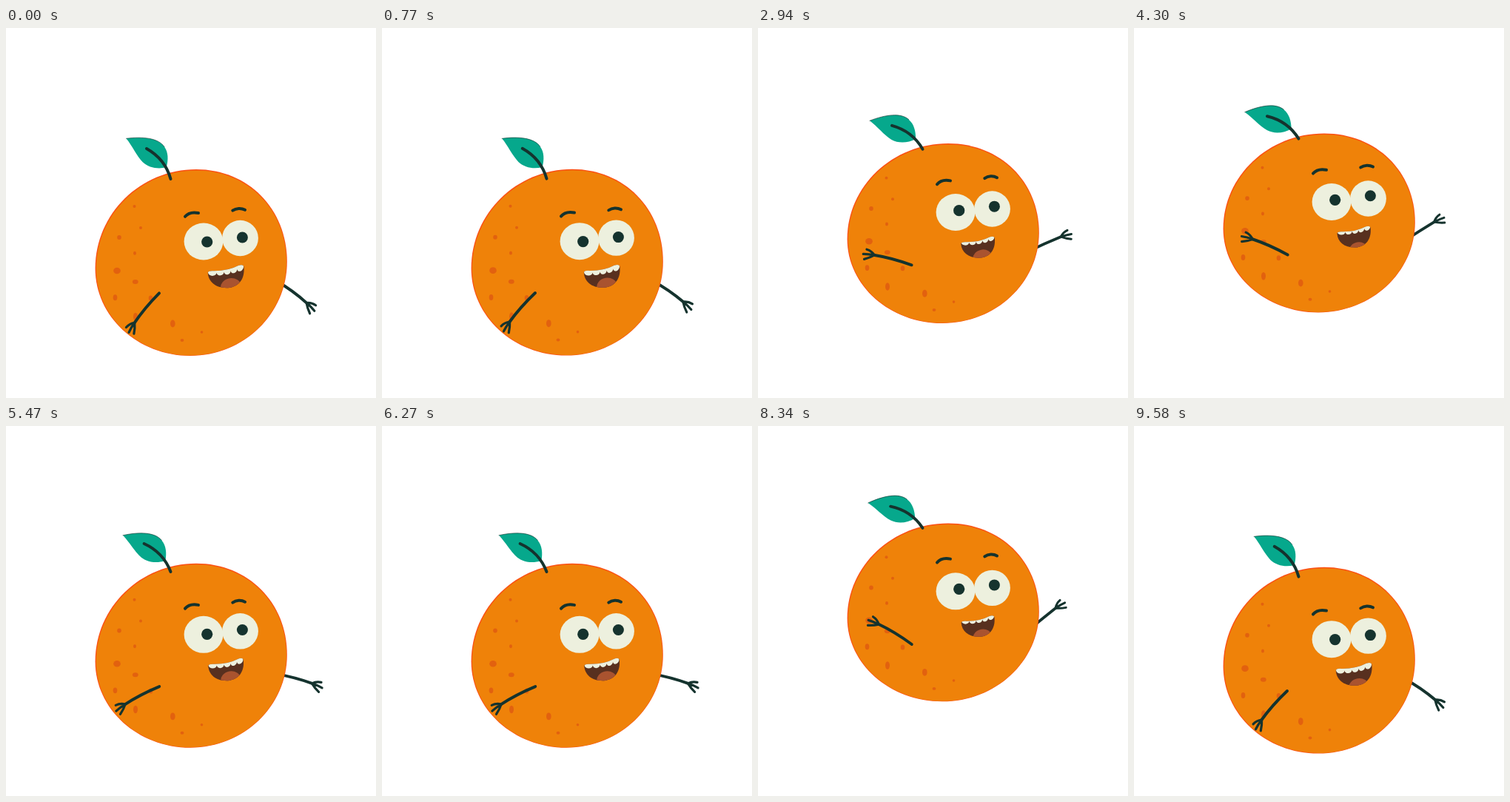
Write an HTML page with a canvas that moves like this. It is 500x500 px and loops after 9.62 s.

```html
<!DOCTYPE html>
<html lang="en">
<head>
<meta charset="utf-8">
<title>Bouncing orange</title>
<style>
  html, body { margin: 0; width: 100%; height: 100%; overflow: hidden; background: #fff; }
  canvas { display: block; width: 500px; height: 500px; }
</style>
</head>
<body>
<canvas id="stage"></canvas>
<script>
const LOOP = 9620, FRAMES = 288, STEP = LOOP / FRAMES;
const BOUNCE = 24, TALK = 23.3;
const INK = '#15332e', PEEL = '#ef8209', RIM = '#fb4f14', SPOT = '#e2610f';
const CREAM = '#edf0de', MOUTH = '#58301f', TONGUE = '#a9532f', LEAF = '#06a88c';
const RAD = Math.PI / 180;

// x, y, rx, ry of the peel marks
const SPOTS = [
  [173.5, 241, 2, 2], [182, 270, 2, 2], [153, 283, 2.8, 3], [174, 304.3, 2, 2.5],
  [150, 328, 4.8, 4.3], [174.8, 343, 3.9, 3], [147.5, 364.3, 2.8, 4], [195.5, 365, 2.8, 3.6],
  [175, 390, 3, 5.3], [225.3, 399.5, 3.3, 5], [238, 422, 2.4, 2], [264.5, 411, 1.8, 1.8]
];

const canvas = document.getElementById('stage');
const ctx = canvas.getContext('2d');
const ratio = window.devicePixelRatio || 1;
canvas.width = canvas.height = 500 * ratio;

const smooth = s => s * s * (3 - 2 * s);

// Cubic ease with flat ends; a and b are the handle positions in time
function ease(x, a, b) {
  let lo = 0, hi = 1;
  for (let i = 0; i < 30; i++) {
    const s = (lo + hi) / 2, r = 1 - s;
    if (3 * r * r * s * a + 3 * r * s * s * b + s * s * s < x) lo = s;
    else hi = s;
  }
  return smooth(lo);
}

// Runs 0 to 1 and back over one period
function pingPong(frame, period) {
  const p = (frame % period) / period;
  return 1 - Math.abs(1 - 2 * p);
}

function group(draw) {
  ctx.save();
  draw();
  ctx.restore();
}

function oval(x, y, rx, ry, color, turn = 0) {
  ctx.beginPath();
  ctx.ellipse(x, y, rx, ry, turn, 0, 2 * Math.PI);
  ctx.fillStyle = color;
  ctx.fill();
}

function line(d, width) {
  ctx.lineWidth = width;
  ctx.strokeStyle = INK;
  ctx.stroke(new Path2D(d));
}

function fill(d, color) {
  ctx.fillStyle = color;
  ctx.fill(new Path2D(d));
}

// Points along +x; side is -1 for the mirrored arm
function arm(x, y, side, degrees, size, bow) {
  group(() => {
    ctx.translate(x, y);
    ctx.scale(side, 1);
    ctx.rotate(degrees * RAD);
    ctx.scale(size, size);
    line(`M0 0Q28 ${bow} 53 0`, 4);
    line('M52 0Q57 -4.6 64 -4.8M52 0Q60 .5 67 2.4M52 0Q57 5 64 8.8', 3.2);
  });
}

// Four rounded quarters between the left, top, right and bottom extremes
function peelPath() {
  const left = [120.6, 325], top = [257, 191], right = [379.8, 316], bottom = [249, 443];
  const path = new Path2D();
  const quarter = (a, b, upright, k) => {
    const dx = (b[0] - a[0]) * k, dy = (b[1] - a[1]) * k;
    if (upright) path.bezierCurveTo(a[0], a[1] + dy, b[0] - dx, b[1], ...b);
    else path.bezierCurveTo(a[0] + dx, a[1], b[0], b[1] - dy, ...b);
  };
  path.moveTo(...left);
  quarter(left, top, true, 0.552);
  quarter(top, right, false, 0.572);
  quarter(right, bottom, true, 0.552);
  quarter(bottom, left, false, 0.552);
  path.closePath();
  return path;
}
const PEEL_PATH = peelPath();

function body(e) {
  group(() => {
    ctx.translate(250.3, 317);
    ctx.scale(1, 1 - 0.048 * e);
    ctx.translate(-250.3, -317);
    ctx.fillStyle = RIM;
    ctx.fill(PEEL_PATH);
    ctx.clip(PEEL_PATH);
    ctx.translate(250.5, 317.5);
    ctx.scale(0.992, 0.992);
    ctx.translate(-250.3, -317);
    ctx.fillStyle = PEEL;
    ctx.fill(PEEL_PATH);
  });
  group(() => {
    ctx.translate(0, 317);
    ctx.scale(1, 1 - 0.02 * e);
    for (const [x, y, rx, ry] of SPOTS) oval(x, y - 317, rx, ry, SPOT);
  });
}

function leaf(e) {
  group(() => {
    ctx.translate(222.5, 204 - e);
    ctx.rotate(-19 * e * RAD);
    ctx.translate(-222.5, -204);
    fill('M162.5 149.3C185 146.5 206 148.5 214 160.5C219.5 168 219.5 178 216.8 188.3' +
         'C205 191 193 189 184.5 181C176 172 171 160 162.5 149.3Z', LEAF);
    line('M162.5 149.3C185 146.5 206 148.5 214 160.5', 0.6);
    line('M190 163C206 172 217.5 186 222.5 204', 4);
  });
}

function eyes(e) {
  oval(267, 288.5, 26.4, 25, CREAM);
  oval(316.5, 284, 24.4, 24.2, CREAM);
  oval(271.7, 289 - 3.8 * e, 7.6, 7.6, INK);
  oval(319.4, 283 - 3.2 * e, 7.5, 7.5, INK);
  group(() => {
    ctx.translate(0, -5.6 * e);
    line('M242 254.8C246 250 253 248.6 260 250', 4);
    line('M306.3 246.7C311 243.3 318 243 323 245.8', 4);
  });
}

// Scalloped strip, wide enough above to be cut by the upper lip
function teeth() {
  const edges = [0, 0.24, 0.45, 0.64, 0.82, 1];
  const cusp = t => [273 + 48 * t, 330.8 + 2.4 * t - 10.2 * t * t];
  ctx.beginPath();
  ctx.moveTo(273, 320);
  ctx.lineTo(321, 312);
  ctx.lineTo(...cusp(1));
  for (let i = 5; i > 0; i--) {
    const [x1, y1] = cusp(edges[i]), [x0, y0] = cusp(edges[i - 1]);
    ctx.bezierCurveTo(x1 - 0.5, y1 + 5.5, x0 + 1, y0 + 5.5, x0, y0);
  }
  ctx.fillStyle = CREAM;
  ctx.fill();
}

function mouth(e, drop) {
  group(() => {
    const size = 1 - 0.085 * e;
    ctx.translate(297, 336);
    ctx.scale(size, size);
    ctx.translate(-297, -336);
    const shape = 'M272.7 330.5Q274 327.8 280 328.2Q300 328.5 314 321Q320 319 321.3 322' +
                  'C323 335 318 348.5 302 351C285 352.5 273.5 344 272.7 330.5Z';
    fill(shape, MOUTH);
    ctx.clip(new Path2D(shape));
    oval(304, 350 + drop, 14, 12, TONGUE, -10 * RAD);
    ctx.translate(0, -2.6 * e);
    teeth();
  });
}

function draw(frame) {
  const p = pingPong(frame, BOUNCE);
  const e = smooth(p);
  const lift = 73.3 * ease(p, 0.73, 0.667);
  const drop = 5.5 * ease(pingPong(frame, TALK), 0.75, 0.5);

  ctx.setTransform(ratio, 0, 0, ratio, 0, 0);
  ctx.fillStyle = '#fff';
  ctx.fillRect(0, 0, 500, 500);
  ctx.lineCap = ctx.lineJoin = 'round';
  ctx.translate(0, -lift);

  arm(364, 341 + 1.2 * e, 1, 36 - 81 * e, 1 - 0.06 * e, -3 + 3 * e);
  body(e);
  leaf(e);
  eyes(e);
  mouth(e, drop);
  arm(207 + 0.8 * e, 358.3 + 2 * e, -1, 50.3 - 88 * e, 1, -2.5);
}

function tick() {
  const t = performance.now() % LOOP;
  draw(Math.floor((t + 11) / STEP) % FRAMES);
  requestAnimationFrame(tick);
}
tick();
</script>
</body>
</html>
```
